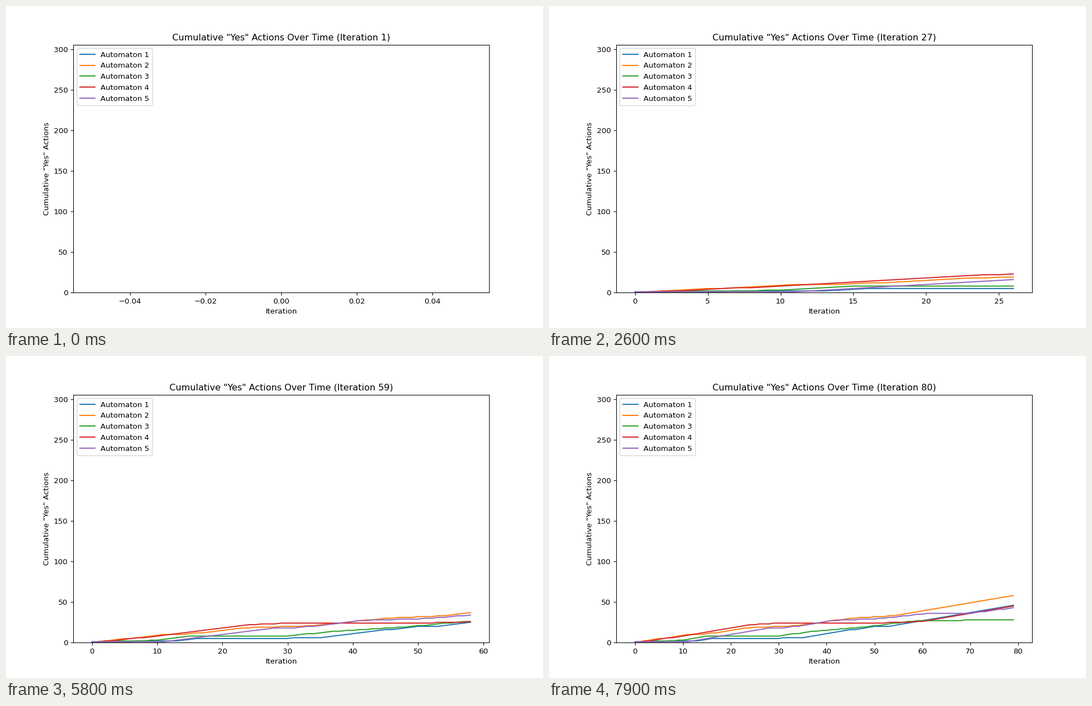
A matplotlib script that plays this animation: 966 by 580 pixels, repeating every 8000 ms.

```python
import matplotlib.pyplot as plt
import numpy as np
from matplotlib.animation import FuncAnimation

WIDTH, HEIGHT, DPI = 966, 580, 96.6
STEPS = 80
INTERVAL = 100
Y_MAX = 305.5

# Turning points (iteration, total) where an automaton changes its pace.
TRENDS = [
    [(0, 1), (13, 2), (16, 5), (34, 5.6), (50, 20), (53, 20), (79, 46)],
    [(0, 0), (11, 10), (15, 10.6), (23, 18), (34, 21), (45, 30), (54, 33),
     (79, 58)],
    [(0, 0.5), (10, 3), (15, 8), (30, 8), (37, 14), (46, 18), (59, 27),
     (79, 28)],
    [(0, 0), (10, 8), (24, 22), (30, 24), (50, 24), (60, 26), (79, 45)],
    [(0, 1), (11, 1), (28, 18), (32, 18.6), (41, 27), (52, 30), (61, 36),
     (70, 36), (79, 43)],
]


def count_yes(trend):
    """Whole-number count that follows the trend one action at a time."""
    return np.rint(np.interp(np.arange(STEPS), *zip(*trend)))


totals = [count_yes(trend) for trend in TRENDS]

plt.rcParams["font.family"] = "DejaVu Sans"
fig, ax = plt.subplots(figsize=(WIDTH / DPI, HEIGHT / DPI), dpi=DPI)


def update(frame):
    ax.clear()
    iterations = np.arange(frame + 1)
    for i, total in enumerate(totals, start=1):
        ax.plot(iterations, total[:frame + 1], label=f"Automaton {i}")
    ax.set_ylim(0, Y_MAX)
    ax.set_xlabel("Iteration")
    ax.set_ylabel('Cumulative "Yes" Actions')
    ax.set_title(f'Cumulative "Yes" Actions Over Time (Iteration {frame + 1})')
    ax.legend(loc="upper left")


anim = FuncAnimation(fig, update, frames=STEPS, init_func=lambda: None,
                     interval=INTERVAL, repeat=True, repeat_delay=0)
plt.show()
```
